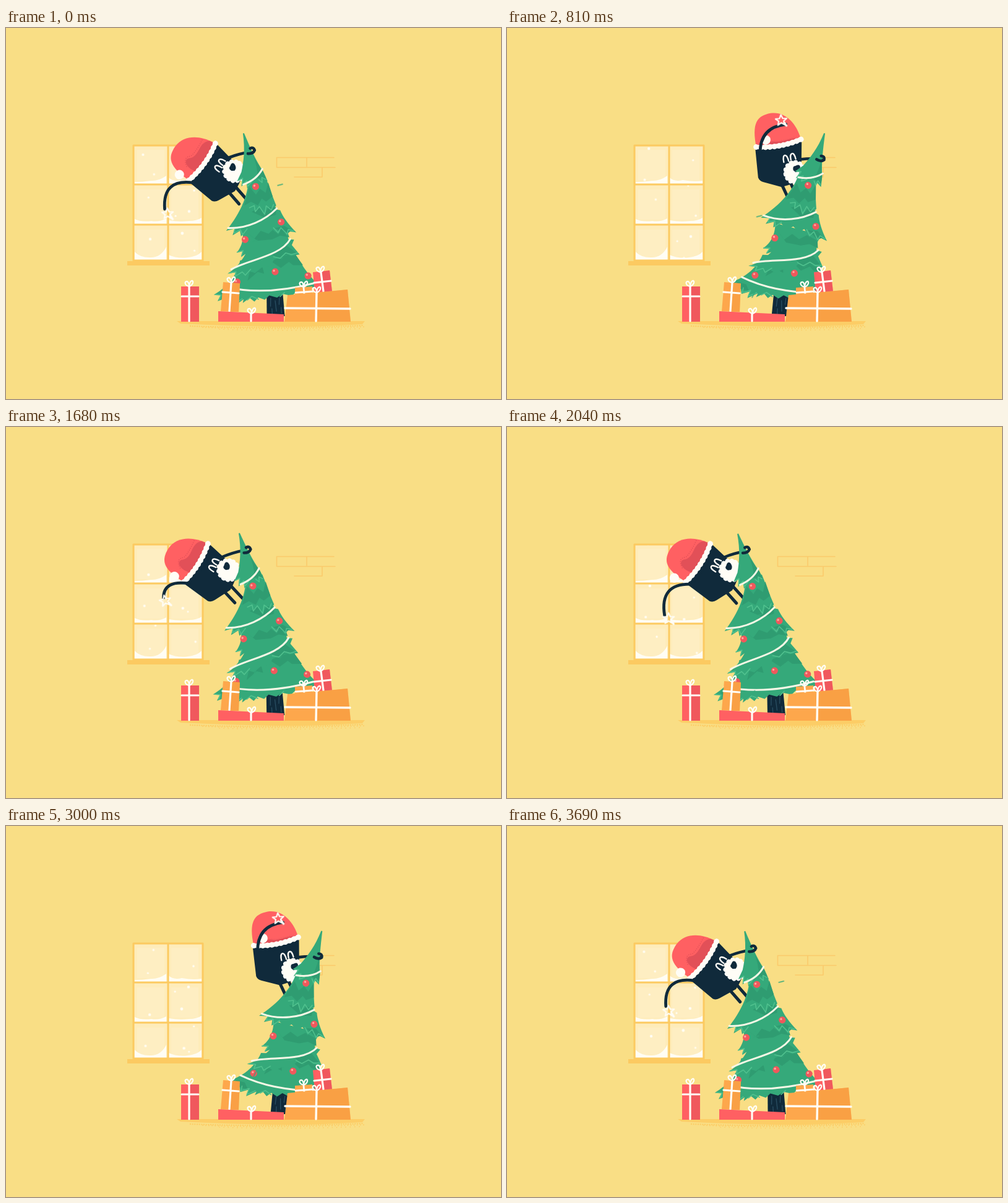
An HTML page without scripts that plays this animation: 800 by 600 pixels, repeating every 3720 ms.

```html
<!DOCTYPE html>
<html lang="en">
<head>
<meta charset="utf-8">
<title>Trimming the tree</title>
<style>
  /* --bend: sway of the tree, --rush: how far the climber runs ahead of it */
  @property --bend { syntax: "<number>"; inherits: true; initial-value: -1.16; }
  @property --rush { syntax: "<number>"; inherits: true; initial-value: 0; }

  html, body { margin: 0; width: 100%; height: 100%; overflow: hidden; background: #f9de85; }
  svg {
    display: block; width: 800px; height: 600px;
    --loop: 3.72s;
    --sine: cubic-bezier(.37, 0, .63, 1);
    animation: bend var(--loop) var(--sine) infinite, rush var(--loop) var(--sine) infinite;
  }
  @keyframes bend {
    0%, 100% { --bend: -1.16; }
    24.8% { --bend: .94; }
    50.3% { --bend: -1.5; }
    77% { --bend: .95; }
  }
  @keyframes rush {
    0%, 21.8%, 27%, 50.3%, 74%, 80.6%, 100% { --rush: 0; }
    12.6%, 65% { --rush: 1; }
    36.5%, 90% { --rush: -1; }
  }

  .tier {
    transform:
      translate(calc(var(--bend) * var(--x) * 1px),
                calc(var(--bend) * var(--y) * 1px + var(--bend) * var(--bend) * var(--lift) * 1px))
      rotate(calc(var(--bend) * var(--r) * 1deg));
  }
  .top   { --x: 41;   --y: 0;  --lift: 3.2; --r: 15; transform-origin: 451px 252px; }
  .upper { --x: 29.5; --y: 2;  --lift: 1;   --r: 9;  transform-origin: 465px 300px; }
  .mid   { --x: 20;   --y: 0;  --lift: 1.5; --r: 8;  transform-origin: 418px 360px; }
  .base  { --x: 14;   --y: -2; --lift: .5;  --r: 6;  transform-origin: 420px 400px; }
  .trunk {
    transform: translateX(calc(var(--bend) * 3px)) skewX(calc(var(--bend) * -3deg));
    transform-origin: 440px 466px;
  }
  .hand { transform: translateY(calc(min(var(--bend), 0) * 9px)); }

  .climber {
    transform:
      translate(calc(388px + var(--bend) * 60px - var(--bend) * var(--bend) * 1px + var(--rush) * 11px),
                calc(196px - var(--bend) * 14px + var(--bend) * var(--bend) * 3px - var(--rush) * 2.5px))
      rotate(calc(-32deg + var(--bend) * 22deg + var(--rush) * 3.5deg));
  }
  .fold { transform: scaleY(calc(.62 - var(--bend) * .33)); transform-origin: 0 4px; }
  .pompom {
    transform: translate(calc(-27px + var(--bend) * 9px - var(--rush) * 7px),
                         calc(-14px + var(--bend) * 5px - var(--rush) * 3px));
  }
  .grip {
    transform: rotate(calc(25deg - var(--bend) * 15deg)) scaleX(calc(1 - var(--rush) * .22));
    transform-origin: 30px 34px;
  }
  .legs {
    transform: translateX(calc(max(var(--bend), 0) * 8px)) rotate(calc(var(--bend) * -14deg));
    transform-origin: -11px 62px;
  }

  .arm { animation: arm var(--loop) var(--sine) infinite; }
  @keyframes arm {
    0%, 100% { d: path("M-36 7Q-57 -40 -97 -10"); }
    13.5%, 66.1% { d: path("M-34 7Q-37 -22 -40 -50"); }
    21.8%, 27%, 74%, 80.6% { d: path("M-33 9Q-24 -32 18 -27"); }
    35.5%, 88% { d: path("M-32 7Q-26 -20 -17 -48"); }
    51%, 54.8% { d: path("M-36 7Q-60 -38 -101 -5"); }
  }
  .star { animation: star var(--loop) var(--sine) infinite; }
  @keyframes star {
    0%, 100% { transform: translate(-101px, -2px) rotate(56deg); }
    13.5%, 66.1% { transform: translate(-50px, -50px) rotate(20deg); }
    21.8%, 27%, 74%, 80.6% { transform: translate(12px, -35px) rotate(10deg); }
    35.5%, 88% { transform: translate(-24px, -51px) rotate(25deg); }
    51%, 54.8% { transform: translate(-102px, 3px) rotate(60deg); }
  }

  .snow circle { animation: fall var(--loop) linear infinite; animation-delay: calc(var(--p) * -3.72s); }
  @keyframes fall { to { transform: translate(5px, 187px); } }
  .needles path { animation: shed 1.24s ease-in infinite; animation-delay: calc(var(--p) * -1.24s); }
  @keyframes shed {
    0% { opacity: 1; }
    55% { opacity: 1; transform: translate(-8px, 60px); }
    56%, 100% { opacity: 0; transform: translate(-8px, 60px); }
  }

  .line { fill: none; stroke-linecap: round; stroke-linejoin: round; }
  .white { stroke: #fffdf6; }
  .ink { stroke: #102a3b; }
  .garland { stroke: #f6f7e6; stroke-width: 3; }
  .leaf { fill: #35a97a; }
  .shade { fill: #2f9c71; }
  .tips { stroke: #50c18e; stroke-width: 1.6; }
  .red { fill: #ff6062; }
  .deep { fill: #e25058; }
  .orange { fill: #fda74c; }
  .amber { fill: #f59a3d; }
  .side { opacity: .5; }
</style>
</head>
<body>
<svg viewBox="0 0 800 600" aria-label="A climber with a star sways on a Christmas tree">
  <defs>
    <path id="bow" class="line white" stroke-width="2.3" d="M0 0C-8 -2 -8 -9 -3 -8Q0 -6 0 0C1 -11 7 -11 6 -6Q5 -2 0 0"/>
    <g id="ball">
      <circle r="5.6" fill="#f0585c"/>
      <circle cx="-1.6" cy="-1.8" r="1.7" fill="#ffa9a0"/>
    </g>
    <clipPath id="glass"><path d="M207 191H317V375H207Z"/></clipPath>
  </defs>

  <rect width="800" height="600" fill="#f9de85"/>

  <!-- window -->
  <path d="M206 191H318V376H206Z" fill="#feecba"/>
  <path d="M212 197H256V246H212ZM267 197H311V246H267ZM212 261H256V310H212ZM267 261H311V310H267ZM212 326H256V370H212ZM267 326H311V370H267Z" fill="#fff0c8" opacity=".6"/>
  <g class="snow" clip-path="url(#glass)" fill="#fffdf4">
    <circle cx="221" cy="188" r="2" style="--p:.09"/>
    <circle cx="283" cy="188" r="2.3" style="--p:.11"/>
    <circle cx="291" cy="188" r="1.5" style="--p:.14"/>
    <circle cx="238" cy="188" r="1.7" style="--p:.26"/>
    <circle cx="302" cy="188" r="1.8" style="--p:.4"/>
    <circle cx="228" cy="188" r="1.6" style="--p:.46"/>
    <circle cx="293" cy="188" r="2.3" style="--p:.58"/>
    <circle cx="271" cy="188" r="1.6" style="--p:.62"/>
    <circle cx="281" cy="188" r="2.4" style="--p:.77"/>
    <circle cx="229" cy="188" r="2.2" style="--p:.82"/>
    <circle cx="300" cy="188" r="1.6" style="--p:.92"/>
  </g>
  <g fill="#fffdf4">
    <path d="M208 252V249Q222 249 234 247Q246 248 259 239V252ZM263 252V242Q270 249 284 246Q302 249 316 247V252Z"/>
    <path d="M208 317V309Q218 314 235 312Q248 314 259 308V317ZM263 317V311Q280 314 296 312Q308 312 316 307V317Z"/>
    <path d="M208 375V362Q216 371 232 371Q250 372 259 354V375ZM263 375V367Q276 373 294 371Q308 370 316 362V375Z"/>
  </g>
  <path class="line" stroke="#fcca61" stroke-width="3" d="M206 190H318V376H206ZM262 190V376M206 253H318M206 318H318"/>
  <path d="M196 377H329V384H196Z" fill="#fcca61"/>

  <!-- bricks -->
  <path class="line" stroke="#fbca6b" stroke-width="1.6" d="M530 209.500H437.500V225.500H532M486 210V224M511 226V241H466"/>

  <!-- ground -->
  <path d="M276 474H580L576 479Q500 484 430 483T282 478Z" fill="#fccd66"/>
  <g class="line" stroke="#fccd66">
    <path stroke-width="2.4" stroke-dasharray="0 3.7" d="M298 482Q430 487 577 481"/>
    <path stroke-width="2" stroke-dasharray="0 5.1" d="M318 484Q430 489 582 483"/>
    <path stroke-width="1.7" stroke-dasharray="0 7.3" d="M345 487Q450 491 575 486"/>
  </g>

  <!-- climber -->
  <g class="climber">
    <path class="line ink legs" stroke-width="5" d="M-18 60V90M-4 63V93"/>
    <path class="line ink grip" stroke-width="4.6" d="M28 34Q46 32 62 34"/>
    <path fill="#102a3b" d="M-39 0L-45 47Q-44 53 -38 56L-12 70Q15 71 24 58L38 0Z"/>
    <path class="line white" stroke-width="2.3" d="M1 32C1 18 9 18 9 32M13 31C13 18 21 18 21 31"/>
    <ellipse cx="15" cy="52" rx="15" ry="16" fill="#fffdf6"/>
    <ellipse class="line white" cx="15" cy="52" rx="15" ry="16" stroke-width="8" stroke-dasharray="0 7"/>
    <path fill="#102a3b" d="M13 48Q13 41 18 42Q26 40 25 46Q22 53 16 52Z"/>

    <path class="red" d="M-37 0C-36 -42 -24 -51 -2 -50C22 -48 34 -25 36 -2Q0 10 -37 0Z"/>
    <g class="fold">
      <path class="deep" d="M-18 2C-24 -16 -14 -28 -7 -21C0 -12 10 -15 20 -15Q30 -15 35 -8L36 0Q6 9 -18 2Z"/>
      <path class="line" stroke="#e25058" stroke-width="1.6" stroke-dasharray="0 3.4" d="M-20 -17Q-10 -31 -2 -20Q10 -17 31 -19"/>
    </g>
    <path class="line white" stroke-width="7" d="M-37 -2Q0 9 37 2"/>
    <path class="line white" stroke-width="9" stroke-dasharray="0 7.4" d="M-37 -2Q0 9 37 2"/>
    <path class="line ink" stroke-width="3" stroke-dasharray="2 3" d="M-33 8Q0 17 32 10"/>
    <circle class="pompom" r="7.6" fill="#fffdf6"/>
    <path class="line ink arm" stroke-width="4.8" d="M-36 7Q-57 -40 -97 -10"/>
    <g class="star line white" stroke-width="2.2">
      <path d="M0 -9L2.600 -3L9 -2.600L4 1.400L5.600 7.600L0 4L-5.600 7.600L-4 1.400L-9 -2.600L-2.600 -3Z"/>
      <path stroke-width="3.4" d="M5 4L8 9"/>
    </g>
  </g>

  <!-- tree -->
  <g class="trunk">
    <path fill="#102a3b" d="M427 428H453L454 466H425Z"/>
    <path class="line" stroke="#2a4f63" stroke-width="1.3" d="M433 437L432 450M440 441L441 458M447 437L446 447M434 454V462M449 452V461"/>
  </g>

  <g class="tier base">
    <path class="leaf" d="M398 370C390 395 370 411 349 420L360 422L354 431L368 428L370 436L383 431L380 442L396 433L394 439L406 432L413 439L420 433L430 438L438 432L450 437L460 432L474 437L484 430L514 429L515 419C504 406 494 385 486 366Z"/>
    <path class="shade" d="M396 380L412 388L406 404L424 392L434 396L432 380L486 368L498 390L482 388L476 382L462 390L448 378ZM360 417L376 420L382 431L368 428Z"/>
    <path class="line tips" d="M352 420L361 422L357 429M372 426L371 434L384 429L381 439L394 432M402 435L410 430L420 436M455 436L463 430"/>
    <path class="line garland" d="M368 409C410 425 460 428 512 421"/>
    <use href="#ball" x="452" y="395"/>
    <use href="#ball" x="389" y="404"/>
    <use href="#ball" x="504" y="408"/>
  </g>

  <g class="tier mid">
    <path class="leaf" d="M411 315C413 338 405 350 396 358L406 357L402 366L410 362C398 377 388 384 376 389L389 389L386 397L398 391L402 398L412 391L420 395L432 388L446 388L456 376L466 380L474 373L482 377L496 377L486 360L491 352L482 350L482 325Z"/>
    <path class="shade" d="M412 322L428 340L440 329L452 336L464 328L482 335L484 347L470 342L456 346L432 344ZM452 370L478 360L494 376L474 374L464 380Z"/>
    <path class="line tips" d="M397 357L407 356L403 364M379 388L390 388L388 395L400 390L404 396L414 388M454 374L464 378L474 371L483 375L493 374"/>
    <path class="line garland" d="M383 383C412 372 466 375 485 350"/>
    <use href="#ball" x="413" y="339"/>
  </g>

  <g class="tier upper">
    <path class="leaf" d="M438 232C434 262 415 290 386 315L400 314L395 324L408 319L408 328L420 320L430 328L440 322L450 330L458 324L468 336L474 329L482 342L485 334L497 338C486 322 480 308 478 298L469 294L473 289C469 270 467 255 464 238Z"/>
    <path class="shade" d="M436 252L444 266L452 258L460 266L467 250L470 274L458 280L452 274L444 284L434 276L422 280ZM432 292L446 288L452 300L460 290L472 292L470 304L452 306ZM464 325L480 324L490 333L482 338Z"/>
    <path class="line tips" d="M390 313L401 313L398 321L409 317L411 326L420 318M430 285L438 283L438 293L446 286L452 300L457 287L464 295L469 287M462 324L468 333L474 326L482 338L485 331L493 335"/>
    <path class="line garland" d="M390 311C420 318 452 309 473 294"/>
    <use href="#ball" x="476" y="317"/>
  </g>

  <g class="tier top">
    <path class="leaf" d="M457 164C453 190 444 209 436 223L425 235L434 234L429 245L439 241L437 251L446 245L450 254L456 246L462 253L465 245L472 250L470 232C464 214 461 186 459 164Z"/>
    <path class="shade" d="M462 204C465 218 468 228 470 234L471 247L465 243L458 240Q464 222 462 204Z"/>
    <path class="line tips" d="M428 234L435 233L431 243L440 239L439 248L447 243M459 243L463 249L465 241L470 246"/>
    <path class="line garland" d="M433 243Q456 242 470 228"/>
    <use href="#ball" x="451" y="252"/>
    <path class="line ink hand" stroke-width="4.600" d="M455 208Q463 211 467 206Q467 200 461 201"/>
  </g>

  <g class="needles line" stroke="#35a97a" stroke-width="1.5">
    <path d="M404 302L412 300" style="--p:.45"/>
    <path d="M440 248L448 246" style="--p:.15"/>
    <path d="M402 392L406 384" style="--p:.8"/>
  </g>

  <!-- gifts -->
  <g stroke-width="3.2">
    <path class="red" d="M283 418H312V475H283Z"/>
    <path class="deep side" d="M298 418H312V475H298Z"/>
    <path class="line white" d="M296 418V474M284 434H311"/>
    <use href="#bow" x="296" y="418"/>
  </g>
  <g stroke-width="3.2">
    <path class="orange" d="M351 411L378 413L376 459L347 458Z"/>
    <path class="amber side" d="M366 412L378 413L376 459L362 459Z"/>
    <path class="line white" d="M364 412L361 458M350 427L376 429"/>
    <use href="#bow" x="364" y="412"/>
  </g>
  <g stroke-width="3.2">
    <path class="red" d="M343 458L449 463V475H343Z"/>
    <path class="line white" d="M396 461V474"/>
    <use href="#bow" x="397" y="462"/>
  </g>
  <g stroke-width="3.2">
    <path class="red" d="M496 395L523 392L527 426L499 429Z"/>
    <path class="deep side" d="M510 394L523 392L527 426L513 428Z"/>
    <path class="line white" d="M509 395L513 426M498 412L525 409"/>
    <use href="#bow" x="508" y="395"/>
  </g>
  <g stroke-width="2.8">
    <path class="orange" d="M467 420L495 418V432H467Z"/>
    <path class="line white" d="M481 420L482 430M468 428L495 426"/>
    <use href="#bow" x="481" y="419"/>
  </g>
  <g stroke-width="3.4">
    <path class="orange" d="M455 432L552 423L557 475H450Z"/>
    <path class="amber side" d="M504 428L552 423L557 475H504Z"/>
    <path class="line white" d="M502 428L501 474M451 453L556 454"/>
    <use href="#bow" x="502" y="428"/>
  </g>
</svg>
</body>
</html>
```
